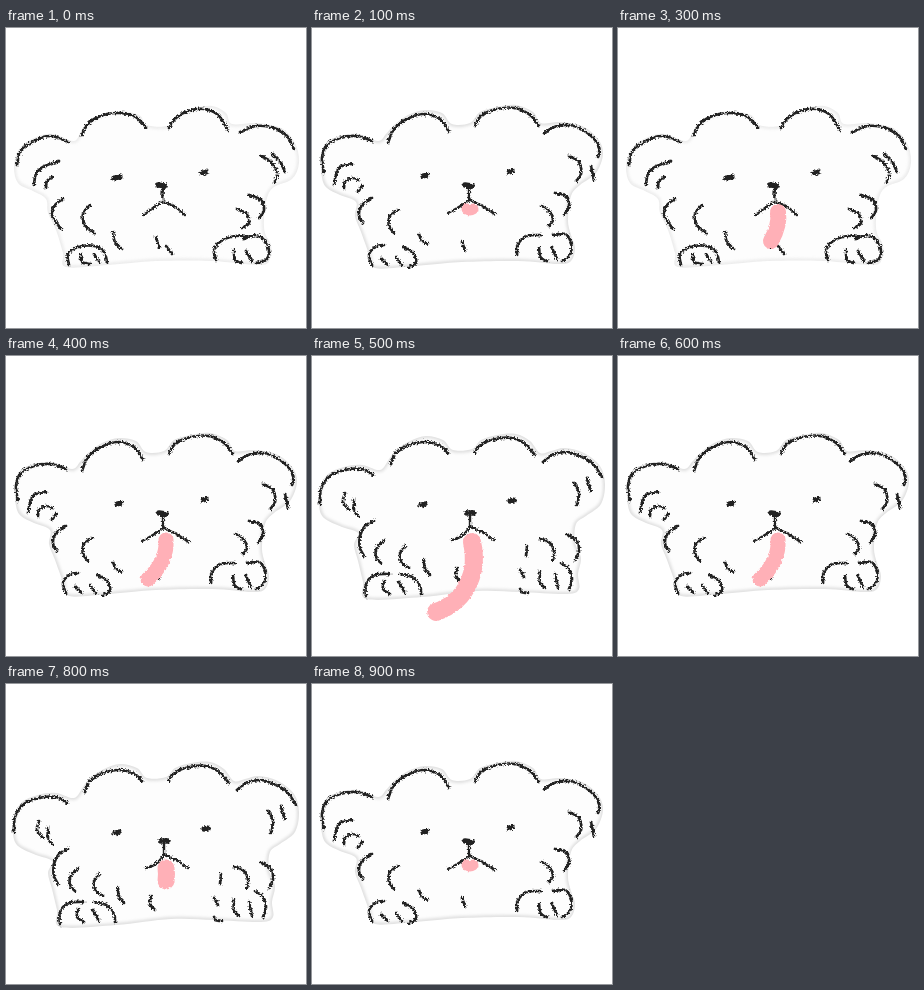
Recreate the animation shown at these times as an HTML page. Size 300 by 300 pixels, loop 1000 ms.

```html
<!DOCTYPE html>
<html lang="en">
<head>
<meta charset="utf-8">
<title>Fluffy dog</title>
<style>
html, body { margin: 0; width: 100%; height: 100%; overflow: hidden; background: #fff; }
svg { display: block; width: 100vw; height: 100vh; }
</style>
</head>
<body>
<svg viewBox="0 0 300 300" xmlns="http://www.w3.org/2000/svg">
  <defs>
    <filter id="crayon" x="0" y="0" width="300" height="300" filterUnits="userSpaceOnUse">
      <feTurbulence id="grain" type="fractalNoise" baseFrequency=".55" numOctaves="2" seed="3"/>
      <feDisplacementMap in="SourceGraphic" scale="4.5" xChannelSelector="R" yChannelSelector="G"/>
    </filter>
    <filter id="soft" x="0" y="0" width="300" height="300" filterUnits="userSpaceOnUse">
      <feGaussianBlur stdDeviation="1.6"/>
    </filter>
    <filter id="chalk" x="0" y="0" width="300" height="300" filterUnits="userSpaceOnUse">
      <feTurbulence type="fractalNoise" baseFrequency=".4" numOctaves="2" seed="8"/>
      <feDisplacementMap in="SourceGraphic" scale="3" xChannelSelector="R" yChannelSelector="G"/>
    </filter>
    <clipPath id="inside"><path id="clip"/></clipPath>
  </defs>
  <path id="body" fill="#fdfdfd"/>
  <g clip-path="url(#inside)">
    <path id="rim" fill="none" stroke="#dedede" stroke-width="4" filter="url(#soft)"/>
  </g>
  <g fill="none" stroke="#222" stroke-linecap="round" stroke-linejoin="round" filter="url(#crayon)">
    <path id="fur" stroke-width="2.7"/>
    <path id="face" stroke-width="2.4"/>
    <path id="eyes" stroke-width="5.2"/>
    <path id="nose" stroke-width="5.6"/>
  </g>
  <path id="tongue" fill="none" stroke="#ffb0b7" stroke-linecap="round" filter="url(#chalk)"/>
</svg>
<script>
const el = id => document.getElementById(id);

// Smooth curve through "x,y x,y ..." points
function curve(text, closed) {
  const p = text.trim().split(/\s+/).map(s => s.split(',').map(Number));
  const n = p.length;
  const at = i => closed ? p[(i + n) % n] : p[Math.max(0, Math.min(n - 1, i))];
  let d = 'M' + p[0];
  for (let i = 0; i < (closed ? n : n - 1); i++) {
    const [a, b, c, e] = [at(i - 1), at(i), at(i + 1), at(i + 2)];
    const h1 = b.map((v, k) => (v + (c[k] - a[k]) / 6).toFixed(1));
    const h2 = c.map((v, k) => (v - (e[k] - b[k]) / 6).toFixed(1));
    d += `C${h1} ${h2} ${c}`;
  }
  return d + (closed ? 'Z' : '');
}
const curves = text => text.split('|').map(s => curve(s)).join('');

const poses = {
  calm: {
    seed: 3, rim: .6,
    body: '8,138 14,120 30,109 47,106 68,113 76,102 90,89 112,83 133,87 141,97 161,98 170,88 186,81 206,78 220,85 226,96 250,95 275,100 289,115 293,135 286,151 268,159 261,170 258,190 259,205 265,217 264,231 254,237 206,233 150,233 102,237 60,239 57,225 50,202 42,185 40,171 27,163 12,155',
    fur: `11,137 15,122 30,112 45,108 62,114 | 28,157 30,146 37,139 53,133 | 40,160 41,153 46,149
      | 76,108 80,98 92,89 110,85 128,88 140,99 | 163,100 170,90 182,83 198,81 212,87 222,102
      | 234,104 250,98 268,100 281,108 288,121 | 255,128 265,134 271,145 269,154 | 266,126 274,134 279,144
      | 57,171 49,177 46,187 55,201 | 84,177 77,186 79,197 88,205 | 107,204 109,214 116,221
      | 150,209 153,219 | 160,218 166,226 | 231,181 241,186 243,195 236,200 | 243,167 255,172 258,182 253,190
      | 63,237 62,226 72,219 88,218 98,224 101,234 | 75,226 76,234 84,236 | 88,226 93,234
      | 210,232 208,222 215,213 230,208 240,208 | 238,211 250,207 259,213 263,223 260,232 250,235
      | 228,222 229,232 236,235 | 240,223 246,233`,
    eyes: 'M108 150L114 149M196 145L200 144', nose: 'M152 157L159 158',
    mouth: '157,160 156,174 | 156,174 147,180 138,187 | 156,174 168,178 179,187'
  },
  up: {
    seed: 11, rim: 1,
    body: '10,150 9,130 14,115 28,108 46,106 66,113 74,106 82,97 96,87 113,82 130,85 140,96 158,95 168,84 185,79 204,77 221,84 229,95 248,94 270,98 286,111 291,126 284,145 268,157 259,168 256,192 259,207 263,220 259,233 246,236 206,233 150,234 103,238 63,240 57,226 49,204 43,188 44,174 28,167 15,160',
    fur: `12,145 10,130 15,117 28,110 45,108 60,113 | 22,156 25,143 30,138 40,136 | 32,160 33,154 40,150 46,152 | 46,164 50,158
      | 76,115 82,101 95,91 112,86 128,91 137,104 | 163,98 170,87 185,81 203,80 218,87 227,98
      | 232,105 245,98 262,98 278,107 287,119 286,129 | 257,128 267,134 269,146 264,153 | 279,138 282,152
      | 60,170 50,177 47,187 51,195 | 86,182 78,188 77,198 82,205 | 107,206 110,213 116,216
      | 150,214 153,222 | 230,178 238,184 241,192 237,198 | 243,165 254,168 257,178 252,187
      | 60,237 57,227 63,219 72,217 | 91,219 101,225 104,235 97,239 | 69,230 76,237 | 84,229 90,237
      | 205,226 206,216 215,208 229,207 | 241,207 253,206 259,215 258,227 250,233
      | 227,220 229,230 236,233 | 240,220 245,231`,
    eyes: 'M111 148L115 147M197 144L200 143', nose: 'M153 157L160 158',
    mouth: '157,160 157,172 | 157,172 147,179 136,185 | 157,172 170,178 183,186'
  },
  wide: {
    seed: 19, rim: 1,
    body: '7,150 8,132 16,118 32,111 50,109 68,114 77,103 84,94 98,85 114,80 131,84 141,94 160,93 169,84 185,79 204,78 218,85 228,97 239,95 253,92 272,97 288,110 293,128 289,148 274,160 264,168 263,186 269,202 266,218 267,233 255,238 208,236 165,235 110,241 55,243 51,226 46,205 42,189 46,177 30,171 12,162',
    fur: `8,148 9,133 18,120 33,114 50,113 61,119 | 33,137 31,146 37,154 | 42,143 42,154 46,160
      | 79,108 84,97 97,89 112,86 127,89 136,97 | 163,96 170,88 184,83 200,82 213,88 223,99
      | 231,106 240,99 254,96 268,100 281,108 290,121 | 262,127 267,137 265,149 | 275,122 279,135
      | 62,165 53,170 48,180 48,192 52,200 | 72,185 65,191 64,201 69,207 | 93,190 88,198 90,207 97,212
      | 112,204 113,213 118,219 | 145,212 144,220 149,226 | 228,183 237,186 242,195 241,204 | 255,178 265,185 267,195 263,204 | 215,190 214,200
      | 54,241 54,228 63,219 78,218 | 88,218 100,221 108,230 109,238 | 72,225 71,233 78,238 | 87,226 93,237
      | 208,233 209,236 216,237 | 208,214 212,221 | 228,215 228,226 233,232 | 243,218 246,232 | 249,207 257,213 260,223 257,233`,
    eyes: 'M109 149L113 148M198 145L202 144', nose: 'M155 157L162 157',
    mouth: '158,160 158,171 | 158,171 150,180 140,184 | 158,171 170,176 182,184'
  }
};

// Tongue shapes by length: path and width
const tongues = [
  ['', 0],
  ['M155 181Q158 183 161 181', 11],
  ['M160 184Q161 190 160 197', 17],
  ['M160 184Q162 197 153 213', 16],
  ['M160 184C161 199 154 212 142 223', 15],
  ['M160 186C166 212 158 244 124 256', 18]
];

const cycle = ['calm', 'up', 'wide'];
const step = 100, count = 10;
let shown = -1;

function draw(ms) {
  const i = Math.floor(ms / step) % count;
  if (i === shown) return;
  shown = i;
  const reach = Math.min(i, count - i);
  const pose = poses[cycle[reach % 3]];
  const outline = curve(pose.body, true);
  for (const id of ['body', 'clip', 'rim']) el(id).setAttribute('d', outline);
  el('rim').setAttribute('opacity', pose.rim);
  el('grain').setAttribute('seed', pose.seed);
  el('fur').setAttribute('d', curves(pose.fur));
  el('face').setAttribute('d', curves(pose.mouth));
  el('eyes').setAttribute('d', pose.eyes);
  el('nose').setAttribute('d', pose.nose);
  const [path, width] = tongues[reach];
  el('tongue').setAttribute('d', path);
  el('tongue').setAttribute('stroke-width', width);
}

const start = performance.now();
function tick() {
  draw(performance.now() - start);
  requestAnimationFrame(tick);
}
tick();
</script>
</body>
</html>
```
